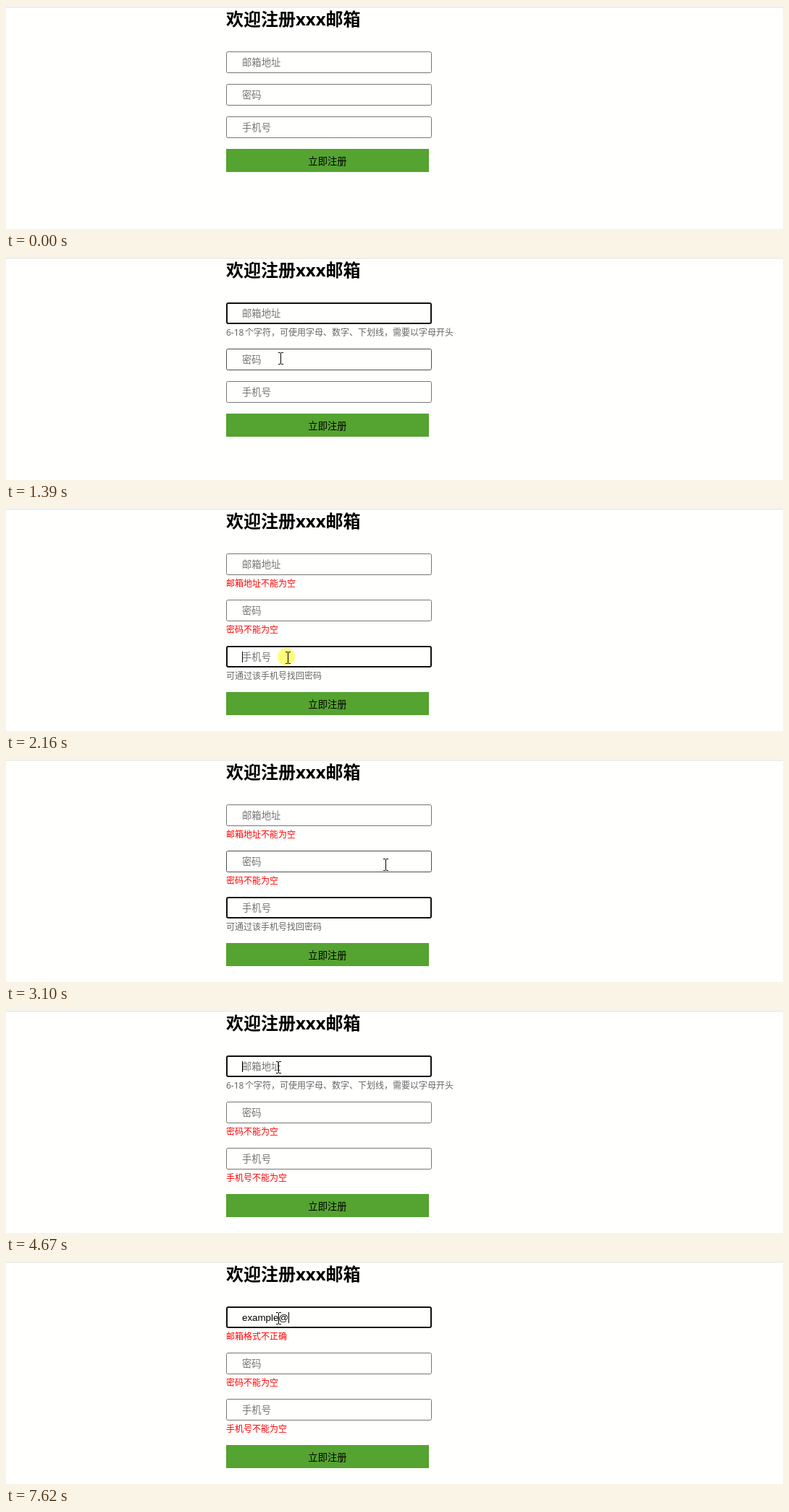
An HTML page with a canvas that plays this animation: 1073x309 px, repeating every 8000 ms.

```html
<!DOCTYPE html>
<html lang="zh-CN">
<head>
<meta charset="utf-8">
<title>注册表单</title>
<style>
html, body { margin: 0; width: 100%; height: 100%; overflow: hidden; background: #fffffd; }
canvas { display: block; }
</style>
</head>
<body>
<canvas id="stage" width="1073" height="309"></canvas>
<script>
const ctx = document.getElementById('stage').getContext('2d');
const LOOP = 8000;
const LEFT = 304, FIELD_W = 284, FIELD_H = 30;
const CJK = "'Noto Sans', 'Noto Sans CJK SC', sans-serif";
const INPUT_FONT = "13.333px 'Liberation Sans', Arial, 'Noto Sans CJK SC', sans-serif";

const fields = [
  { label: '邮箱地址', lead: '6-18', hint: '个字符，可使用字母、数字、下划线，需要以字母开头' },
  { label: '密码', lead: '6-16', hint: '个字符，区分大小写' },
  { label: '手机号', lead: '', hint: '可通过该手机号找回密码' }
];

// Runs of seven evenly spaced screen updates, then single updates while typing.
const bursts = [[280, 1240], [1390, 2310], [2480, 3420], [3570, 4510]];
const updates = [0];
for (const [from, to] of bursts) {
  for (let i = 0; i < 7; i++) updates.push(Math.round((from + (to - from) * i / 6) / 10) * 10);
}
updates.push(4670, 4990, 5290, 5770, 5920, 6550, 6700, 7010, 7160, 7620);

const clicks = [[760, 0], [1700, 1], [2160, 2], [3570, -1], [4510, 0]];
const email = 'example@';
const keyTimes = [4990, 5290, 5770, 5920, 6700, 7010, 7160, 7620];

// Pointer waypoints: time, x, y.
const path = [
  [280, 716, 140], [760, 377, 80], [920, 377, 80], [1390, 379, 140],
  [1700, 381, 141], [1850, 381, 141], [2160, 389, 207], [2310, 389, 207],
  [3420, 624, 101], [3730, 624, 101], [4040, 441, 48], [4360, 376, 79]
];

const lastAtOrBefore = (list, t) => list.filter(v => v <= t).pop();

function pointerAt(t) {
  if (t < path[0][0]) return null;
  const next = path.findIndex(p => p[0] > t);
  if (next < 0) {
    const [, x, y] = path[path.length - 1];
    return { x, y };
  }
  const [t0, x0, y0] = path[next - 1], [t1, x1, y1] = path[next];
  const k = (t - t0) / (t1 - t0);
  return { x: Math.round(x0 + (x1 - x0) * k), y: Math.round(y0 + (y1 - y0) * k) };
}

function text(str, x, y, font, color, align = 'left') {
  ctx.font = font;
  ctx.fillStyle = color;
  ctx.textAlign = align;
  ctx.fillText(str, x, y);
}

function drawBox(top, focused, hovered) {
  const width = focused ? 2 : 1, inset = width / 2;
  ctx.beginPath();
  ctx.roundRect(LEFT + inset, top + inset, FIELD_W - width, FIELD_H - width, 2);
  ctx.lineWidth = width;
  ctx.strokeStyle = focused ? '#101010' : hovered ? '#4f4f4f' : '#767676';
  ctx.stroke();
}

function drawMessage(field, top, focused, value) {
  const y = top + 46, font = '12px ' + CJK;
  if (!focused || value) {
    text(value ? '邮箱格式不正确' : field.label + '不能为空', LEFT, y, font, '#f00');
    return;
  }
  text(field.lead, LEFT, y, font, '#666');
  text(field.hint, LEFT + (field.lead ? 26 : 0), y, font, '#666');
}

function drawHighlight(x, y) {
  ctx.globalCompositeOperation = 'multiply';
  ctx.fillStyle = '#ffff7c';
  ctx.beginPath();
  ctx.arc(x - 2, y - 1, 12, 0, Math.PI * 2);
  ctx.fill();
  ctx.globalCompositeOperation = 'source-over';
}

function drawBeam(x, y) {
  ctx.fillStyle = '#000';
  ctx.fillRect(x, y - 7, 1, 15);
  for (const end of [-8, 8]) {
    ctx.fillRect(x - 3, y + end, 3, 1);
    ctx.fillRect(x + 1, y + end, 3, 1);
  }
}

function drawArrow(x, y) {
  ctx.save();
  ctx.translate(x + 0.5, y + 0.5);
  ctx.beginPath();
  const outline = [[0, 0], [0, 16], [4, 12.5], [6.5, 18], [9, 17], [6.5, 11.5], [11, 11.5]];
  outline.forEach(p => ctx.lineTo(...p));
  ctx.closePath();
  ctx.fillStyle = '#fff';
  ctx.fill();
  ctx.lineWidth = 1;
  ctx.strokeStyle = '#000';
  ctx.stroke();
  ctx.restore();
}

function draw(time) {
  const t = lastAtOrBefore(updates, time);
  const done = clicks.filter(c => c[0] <= t);
  const [clickTime, focus] = done.length ? done[done.length - 1] : [-1, -1];
  const typed = email.slice(0, keyTimes.filter(k => k <= t).length);
  const caretStart = Math.max(clickTime, lastAtOrBefore(keyTimes, t) || 0);
  const caretOn = (t - caretStart) % 1000 < 500;
  const pointer = pointerAt(t);
  let overField = false;

  ctx.fillStyle = '#fffffd';
  ctx.fillRect(0, 0, 1073, 309);
  ctx.fillStyle = '#dcdcdc';
  ctx.fillRect(0, 1, 1073, 1);
  text('欢迎注册xxx邮箱', LEFT, 27, 'bold 24px ' + CJK, '#000');

  let top = 63;
  fields.forEach((field, i) => {
    const focused = focus === i;
    const value = i === 0 ? typed : '';
    const hovered = pointer && pointer.x >= LEFT && pointer.x < LEFT + FIELD_W &&
      pointer.y >= top && pointer.y < top + FIELD_H;
    overField = overField || hovered;

    drawBox(top, focused, hovered);
    text(value || field.label, 326, top + 20, INPUT_FONT, value ? '#000' : '#757575');
    if (focused && caretOn) {
      const caretX = 326 + (value ? Math.round(ctx.measureText(value).width) : 0);
      ctx.fillStyle = '#000';
      ctx.fillRect(caretX, top + 8, 1, 15);
    }
    const visited = done.some(c => c[1] === i);
    if (visited) drawMessage(field, top, focused, value);
    top += visited ? 64 : 45;
  });

  ctx.fillStyle = '#55a331';
  ctx.fillRect(LEFT, top, 280, 32);
  text('立即注册', LEFT + 140, top + 22, INPUT_FONT, '#000', 'center');

  if (!pointer) return;
  if (t === clickTime) drawHighlight(pointer.x, pointer.y);
  (overField ? drawBeam : drawArrow)(pointer.x, pointer.y);
}

const start = performance.now();
function tick() {
  draw((performance.now() - start) % LOOP);
  requestAnimationFrame(tick);
}
tick();
</script>
</body>
</html>
```
